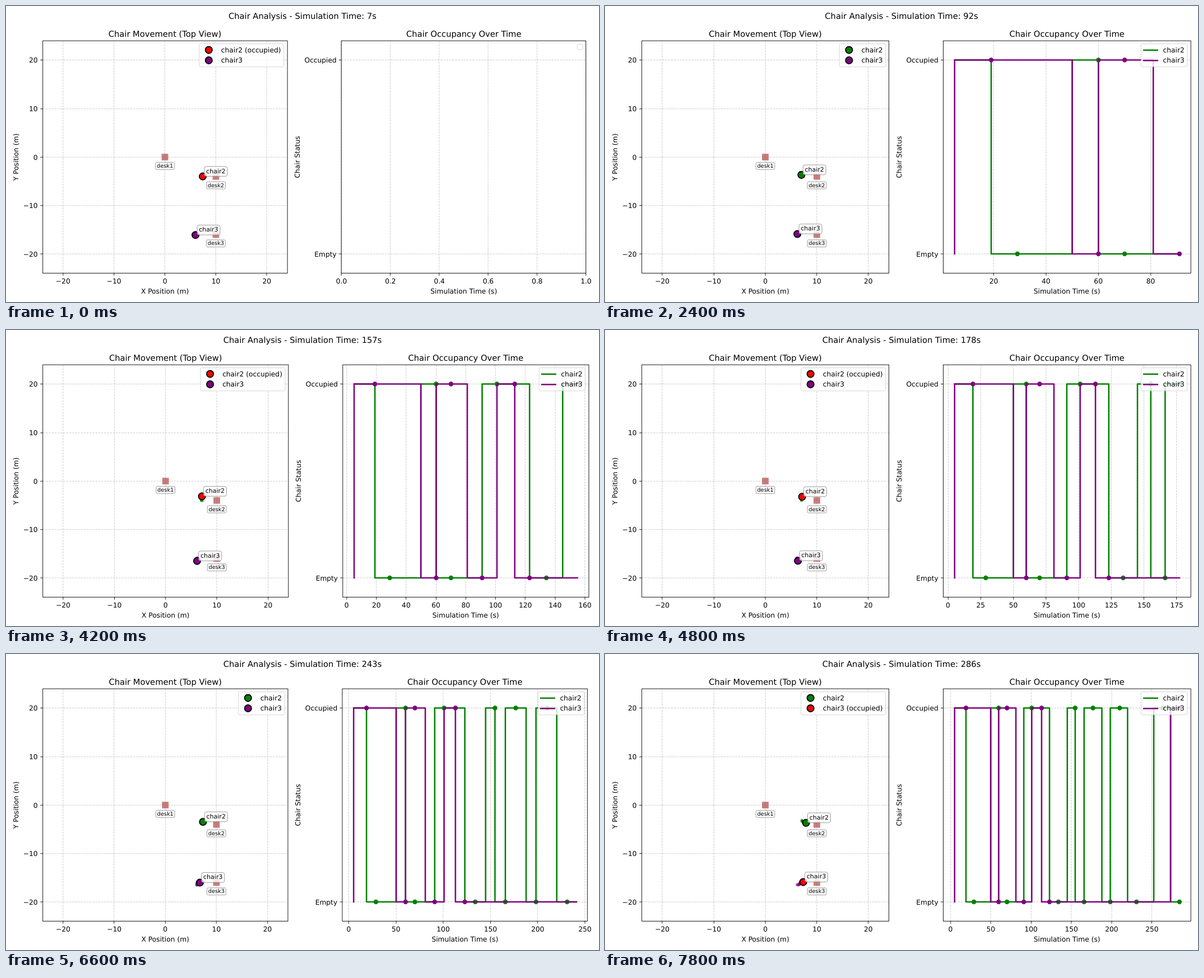
An HTML page for the animation above (8000 ms loop, 1058 by 529 pixels).

```html
<!DOCTYPE html>
<html lang="en">
<head>
<meta charset="utf-8">
<title>Chair Analysis</title>
<style>
  html, body { margin: 0; width: 100%; height: 100%; overflow: hidden; background: #fff; }
  svg { display: block; width: 100%; height: 100%; }
  text { font-family: "DejaVu Sans", Verdana, sans-serif; text-rendering: geometricPrecision; white-space: pre; }
</style>
</head>
<body>
<svg id="stage" viewBox="0 0 1058 529"></svg>
<script>
const LOOP = 8000, STEP = 300;
const PT = 1.2245, FS = 10 * PT;
const TOP = 62.3, BOTTOM = 477.7, LEFT = 65.4, RIGHT = 1044.8, GAP = 96.9;
const EM = { digit: 0.648, dot: 0.318, name: 3.122, occupied: 5.607 };
const TRAIL = 14;

// One sample per step: sample time and time shown in the heading
const TIMES = [5, 19, 29, 39, 50, 60, 70, 81, 91, 101, 113, 123, 134, 145, 155,
  166, 177, 188, 198, 210, 220, 231, 241, 252, 263, 273, 284];
const CLOCK = [7, 20, 30, 41, 52, 62, 72, 82, 92, 103, 114, 125, 136, 146, 157,
  168, 178, 189, 200, 211, 222, 232, 243, 254, 264, 275, 286];
const LAST = TIMES.length - 1;

// seated: one digit per sample; path: [sample, x, y]
const CHAIRS = [
  { name: 'chair2', color: '#008000', seated: '110001000111001011011000110',
    path: [[0, 7.42, -4], [4, 7, -4.05], [8, 7, -3.68], [14, 7.1, -3.15],
      [19, 7.2, -3.35], [22, 7.37, -3.46], [26, 7.9, -3.67]] },
  { name: 'chair3', color: '#800080', seated: '011110110010000000000000001',
    path: [[0, 6, -16.1], [4, 6.02, -16], [8, 6.22, -15.88], [14, 6.15, -16.5],
      [19, 6.6, -16.4], [22, 6.77, -16], [26, 7.36, -15.9]] }
];
const DESKS = [['desk1', 0, 0], ['desk2', 10, -4], ['desk3', 10, -16]];

const isSeated = (chair, k) => chair.seated[k] === '1';

function place(chair, k) {
  const i = Math.max(1, chair.path.findIndex(p => p[0] >= k));
  const a = chair.path[i - 1], b = chair.path[i];
  const f = (k - a[0]) / (b[0] - a[0]);
  return [a[1] + (b[1] - a[1]) * f, a[2] + (b[2] - a[2]) * f];
}

// SVG helpers
const tag = (name, attrs, body = '') =>
  `<${name} ${Object.entries(attrs).map(([k, v]) => `${k}="${v}"`).join(' ')}>${body}</${name}>`;
const text = (s, x, y, size = FS, anchor = 'middle', more = {}) =>
  tag('text', { x, y, 'font-size': size, 'text-anchor': anchor, ...more }, s);
const line = (x1, y1, x2, y2, more = {}) =>
  tag('line', { x1, y1, x2, y2, stroke: '#000', 'stroke-width': 0.9, ...more });
const dot = (cx, cy, r, fill, more = {}) => tag('circle', { cx, cy, r, fill, ...more });
const box = (x, y, width, height, rx, stroke) =>
  tag('rect', { x, y, width, height, rx, fill: '#fff', stroke, 'stroke-width': 0.98, opacity: 0.8 });
const seat = (x, y, fill) => dot(x, y, 6.12, fill, { stroke: '#000', 'stroke-width': 1.84 });
const grid = (x1, y1, x2, y2) =>
  line(x1, y1, x2, y2, { stroke: '#b0b0b0', 'stroke-opacity': 0.7, 'stroke-dasharray': '3.63 1.57' });

// Straight lines sit on the pixel centres of a 1200-wide chart
const FINE = 1200 / 1058;
const snap = v => (Math.floor(v * FINE) + 0.5) / FINE;

function timeAxis(k) {
  if (k === 0) return { min: 0, max: 1, ticks: [0, 1, 2, 3, 4, 5].map(i => i / 5), digits: 1 };
  const span = TIMES[k] - TIMES[0];
  const min = TIMES[0] - span * 0.05, max = TIMES[k] + span * 0.05;
  const step = [1, 2, 5, 10, 20, 25, 50, 100].find(s => s >= (max - min) / 9);
  const ticks = [];
  for (let v = Math.ceil(min / step) * step; v <= max; v += step) ticks.push(v);
  return { min, max, ticks, digits: 0 };
}

// Shrinks both panels until the last tick label fits on the page
function layout(axis) {
  const end = axis.ticks[axis.ticks.length - 1];
  const rest = (axis.max - end) / (axis.max - axis.min);
  const em = axis.digits ? 2 * EM.digit + EM.dot : String(end).length * EM.digit;
  let right = RIGHT, width;
  for (let i = 0; i < 5; i++) {
    width = (right - LEFT - GAP) / 2;
    right -= Math.max(0, right - rest * width + em * FS / 2 - RIGHT);
  }
  width = (right - LEFT - GAP) / 2;
  return { width, x2: right - width };
}

function frameAxes(x, width, xTicks, yTicks, title, xLabel, yLabel, yLabelX) {
  const l = snap(x), r = snap(x + width), t = snap(TOP), b = snap(BOTTOM);
  let back = '', front = '';
  for (const [px, label] of xTicks) {
    const p = snap(px);
    back += grid(p, b, p, t);
    front += line(p, b, p, b + 4.4) + text(label, px, 495.7);
  }
  for (const [py, label] of yTicks) {
    const p = snap(py);
    back += grid(l, p, r, p);
    front += line(l - 4.4, p, l, p) + text(label, x - 8.8, py + 4.5, FS, 'end');
  }
  front += tag('rect', { x: l, y: t, width: r - l, height: b - t, fill: 'none', stroke: '#000', 'stroke-width': 0.9 });
  const mid = x + width / 2;
  front += text(title, mid, 54.7, 12 * PT) + text(xLabel, mid, 513.8);
  front += text(yLabel, 0, 0, FS, 'middle', { transform: `translate(${yLabelX} 270) rotate(-90)` });
  return { back, front };
}

function legend(right, labels, em, handle) {
  const width = em * FS + 3.6 * FS, x = right - 6.1 - width;
  let out = box(x, 67.6, width, 41.2, 2.45, '#ccc');
  labels.forEach((label, i) => {
    const y = 78.6 + i * 18.5;
    out += handle(x + 0.4 * FS, y, i) + text(label, x + 3.2 * FS, y + 4.3, FS, 'start');
  });
  return out;
}

function topView(k, width) {
  const mid = LEFT + width / 2;
  const X = v => mid + v * width / 48, Y = v => 270 - v * 8.654;
  const name = v => String(v).replace('-', '\u2212');
  const ticks = [-20, -10, 0, 10, 20];
  const axes = frameAxes(LEFT, width, ticks.map(v => [X(v), name(v)]), ticks.map(v => [Y(v), name(v)]),
    'Chair Movement (Top View)', 'X Position (m)', 'Y Position (m)', 22);
  let marks = '', notes = '';

  for (const [label, dx, dy] of DESKS) {
    const x = X(dx), y = Y(dy);
    marks += tag('rect', { x: x - 5.3, y: y - 5.3, width: 10.6, height: 10.6,
      fill: '#a52a2a', stroke: '#a52a2a', 'stroke-width': 1.2, opacity: 0.6 });
    notes += box(x - 16.8, y + 9.4, 33.6, 12.8, 2, '#808080') + text(label, x, y + 18.9, 8 * PT);
  }

  for (const chair of CHAIRS) {
    for (let i = Math.max(0, k - TRAIL); i < k; i++) {
      const [tx, ty] = place(chair, i);
      marks += dot(X(tx), Y(ty), 2.8, chair.color, { opacity: 1 - (k - i) / (TRAIL + 1) });
    }
  }
  for (const chair of CHAIRS) {
    const [cx, cy] = place(chair, k), x = X(cx), y = Y(cy);
    marks += seat(x, y, isSeated(chair, k) ? '#f00' : chair.color);
    notes += box(x + 2.8, y - 17.8, 41, 17.6, 3.3, '#808080') + text(chair.name, x + 6.1, y - 6.1, 9 * PT, 'start');
  }

  const labels = CHAIRS.map(c => c.name + (isSeated(c, k) ? ' (occupied)' : ''));
  const em = EM.name + (CHAIRS.some(c => isSeated(c, k)) ? EM.occupied : 0);
  const key = legend(LEFT + width, labels, em, (x, y, i) =>
    seat(x + FS, y, isSeated(CHAIRS[i], k) ? '#f00' : CHAIRS[i].color));
  return axes.back + marks + axes.front + notes + key;
}

function history(k, axis, x0, width) {
  const X = v => x0 + (v - axis.min) / (axis.max - axis.min) * width;
  const Y = v => 443.1 - v * 346.2;
  const axes = frameAxes(x0, width, axis.ticks.map(v => [X(v), v.toFixed(axis.digits)]),
    [[Y(1), 'Occupied'], [Y(0), 'Empty']],
    'Chair Occupancy Over Time', 'Simulation Time (s)', 'Chair Status', x0 - 74.6);
  const right = x0 + width;
  if (k === 0) return axes.back + axes.front + box(right - 15.9, 68.4, 9.8, 9.8, 2.45, '#ccc');

  const stroke = { 'stroke-width': 2.55, 'stroke-linecap': 'square', 'stroke-linejoin': 'round' };
  let marks = '';
  for (const chair of CHAIRS) {
    const at = i => [snap(X(TIMES[i])), snap(Y(+chair.seated[i]))];
    let d = 'M' + at(0), dots = '';
    for (let i = 1; i <= k; i++) {
      const [x, y] = at(i);
      d += `V${y}H${x}`;
      if (chair.seated[i] !== chair.seated[i - 1]) dots += dot(x, y, 4.2, chair.color);
    }
    marks += tag('path', { d, fill: 'none', stroke: chair.color, ...stroke }) + dots;
  }
  const key = legend(right, CHAIRS.map(c => c.name), EM.name, (x, y, i) =>
    line(x, snap(y), x + 2 * FS, snap(y), { ...stroke, stroke: CHAIRS[i].color }));
  return axes.back + marks + axes.front + key;
}

function draw(k) {
  const axis = timeAxis(k), { width, x2 } = layout(axis);
  return tag('rect', { width: 1058, height: 529, fill: '#fff' }) +
    text(`Chair Analysis - Simulation Time: ${CLOCK[k]}s`, 529, 22.9, 12 * PT) +
    topView(k, width) + history(k, axis, x2, width);
}

const stage = document.getElementById('stage');
const start = performance.now();
let shown = -1;

function tick() {
  const t = (performance.now() - start) % LOOP;
  const k = Math.min(LAST, Math.floor(t / STEP));
  if (k !== shown) {
    stage.innerHTML = draw(k);
    shown = k;
  }
  requestAnimationFrame(tick);
}
tick();
</script>
</body>
</html>
```
